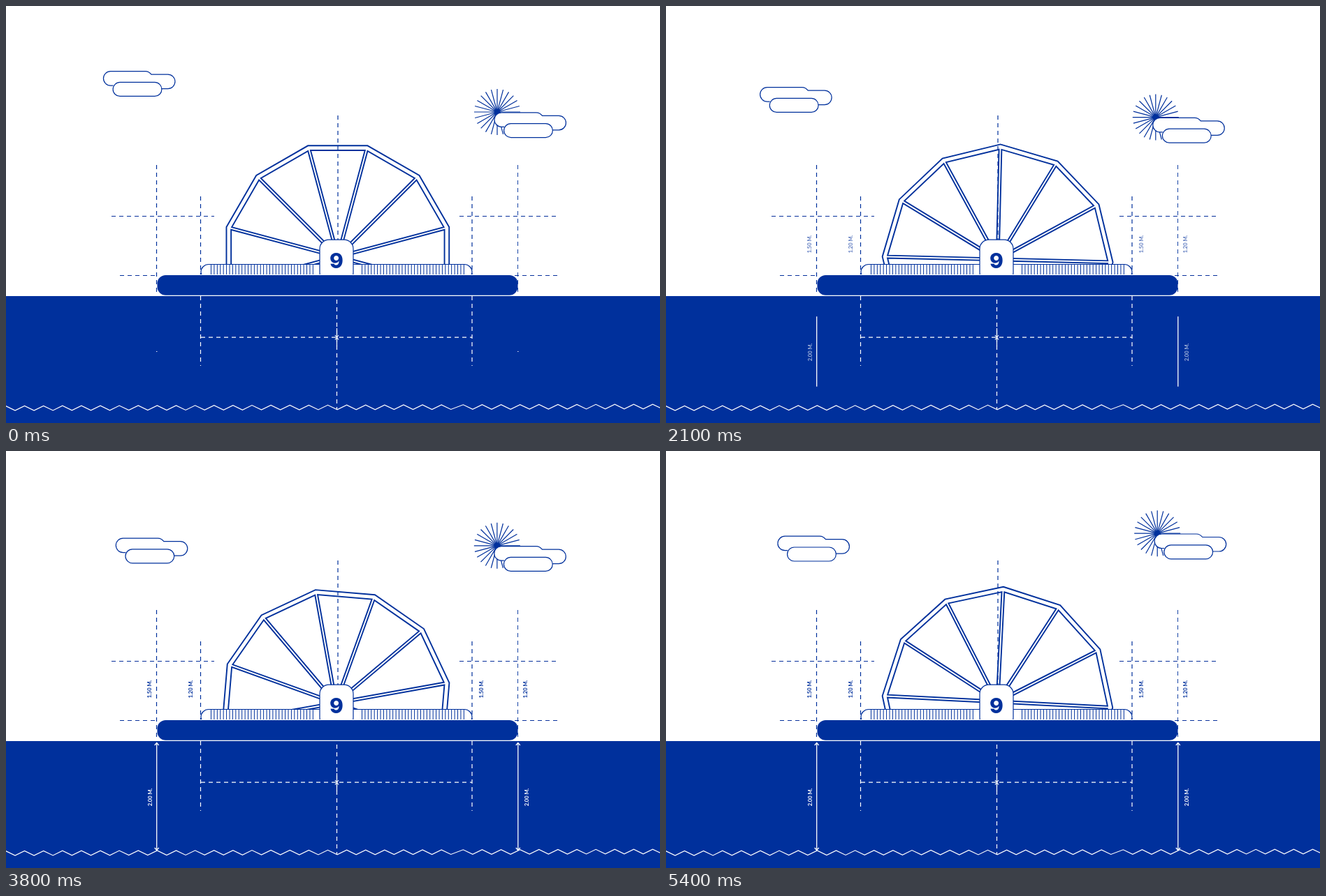
Animation of 936x598 px, one loop 5.5 s. Source, as an HTML page with a canvas:

```html
<!DOCTYPE html>
<html lang="en">
<head>
<meta charset="utf-8">
<title>Wheel blueprint</title>
<style>
html, body { margin: 0; width: 100%; height: 100%; overflow: hidden; background: #fff; }
canvas { display: block; width: 936px; height: 598px; }
</style>
</head>
<body>
<canvas id="stage" width="936" height="598"></canvas>
<script>
const ctx = document.getElementById('stage').getContext('2d');
const BLUE = '#00309c', WHITE = '#fff';
const LOOP = 5500, STEP = 100;
const KEYS = [0, 700, 1300, 2100, 3300, 4400, 5400];
const TURN = [0, 44, 84.1, 136.4, 212.7, 283.5, 347.9];
const CLOUD_X = [139.5, 135.5, 132, 134.7, 152.2, 161.2, 160];
const CLOUD_Y = [93.6, 100.5, 107.2, 116.6, 123.8, 125.2, 122.2];
const SUN_X = [703, 702, 701.3, 700.8, 702.3, 703.3, 703.2];
const SUN_Y = [152, 156.2, 160.5, 159.6, 142.3, 128.7, 118.2];

// Smooth (cubic Hermite) value of a keyed track at time t
function track(values, t) {
  const last = KEYS.length - 1;
  let i = 0;
  while (i < last - 1 && t > KEYS[i + 1]) i++;
  const slope = k => {
    const a = Math.max(k - 1, 0), b = Math.min(k + 1, last);
    return (values[b] - values[a]) / (KEYS[b] - KEYS[a]);
  };
  const span = KEYS[i + 1] - KEYS[i], u = (t - KEYS[i]) / span;
  const u2 = u * u, u3 = u2 * u;
  return values[i] * (2 * u3 - 3 * u2 + 1) + slope(i) * span * (u3 - 2 * u2 + u) +
    values[i + 1] * (3 * u2 - 2 * u3) + slope(i + 1) * span * (u3 - u2);
}

function pen(color, width, dash = []) {
  ctx.strokeStyle = color;
  ctx.lineWidth = width;
  ctx.setLineDash(dash);
}

function line(x1, y1, x2, y2) {
  ctx.beginPath();
  ctx.moveTo(x1, y1);
  ctx.lineTo(x2, y2);
  ctx.stroke();
}

function box(x, y, w, h, r) {
  ctx.beginPath();
  ctx.roundRect(x, y, w, h, r);
  ctx.fill();
}

function wheel(degrees) {
  const radius = 165, sector = Math.PI / 6, half = sector / 2;
  const apex = 7.3, inner = 152.7, spread = (inner - apex) * Math.tan(half);
  ctx.save();
  ctx.beginPath();
  ctx.rect(0, 0, 936, 371);
  ctx.clip();
  ctx.translate(474, 361.5);
  ctx.rotate(degrees * Math.PI / 180);
  ctx.translate(0.85, -1.8);
  pen(BLUE, 1.9);
  ctx.beginPath();
  for (let k = 0; k < 12; k++) {
    const a = half + k * sector;
    ctx.lineTo(radius * Math.sin(a), -radius * Math.cos(a));
  }
  ctx.closePath();
  ctx.stroke();
  for (let k = 0; k < 12; k++) {
    ctx.beginPath();
    ctx.moveTo(0, -apex);
    ctx.lineTo(-spread, -inner);
    ctx.lineTo(spread, -inner);
    ctx.closePath();
    ctx.stroke();
    ctx.rotate(sector);
  }
  ctx.restore();
}

function cloud(x, y) {
  ctx.save();
  ctx.translate(x, y);
  pen(BLUE, 1.2);
  ctx.fillStyle = WHITE;
  ctx.beginPath();
  ctx.moveTo(14, 20.5);
  ctx.arc(10.2, 10.25, 10.25, Math.PI / 2, Math.PI * 1.5);
  ctx.lineTo(60, 0);
  ctx.quadraticCurveTo(65, 0, 68.5, 4.5);
  ctx.arc(92.2, 14.75, 10.25, -Math.PI / 2, Math.PI / 2);
  ctx.lineTo(82, 25);
  ctx.fill();
  ctx.stroke();
  box(13.6, 15.8, 69.8, 20, 10);
  ctx.stroke();
  ctx.restore();
}

function sun(x, y) {
  pen(BLUE, 1.2);
  for (let k = 0; k < 24; k++) {
    const a = k * Math.PI / 12;
    line(x, y, x + 33 * Math.cos(a), y + 33 * Math.sin(a));
  }
  ctx.fillStyle = BLUE;
  ctx.beginPath();
  ctx.arc(x, y, 4.5, 0, 7);
  ctx.fill();
}

function pier() {
  ctx.fillStyle = WHITE;
  pen(BLUE, 1.2);
  box(279, 370.5, 388, 22, 13);
  ctx.stroke();
  pen(BLUE, 1);
  for (let k = 0; k <= 33; k++) {
    const dx = k * 4.42;
    line(293.5 + dx, 371, 293.5 + dx, 385);
    line(509.5 + dx, 371, 509.5 + dx, 385);
  }
  pen(BLUE, 1.2);
  box(449, 335.2, 48, 60, 13);
  ctx.stroke();
  ctx.fillStyle = WHITE;
  ctx.fillRect(210, 385, 530, 31);
  ctx.fillStyle = BLUE;
  box(216.5, 386, 516, 28.8, 12);
  ctx.font = '800 30px Inter, sans-serif';
  ctx.textAlign = 'center';
  ctx.textBaseline = 'alphabetic';
  ctx.fillText('9', 473, 376.3);
}

function water() {
  ctx.fillStyle = BLUE;
  ctx.fillRect(0, 416, 936, 182);
  pen(WHITE, 1.2);
  ctx.beginPath();
  for (let k = -1; k <= 70; k++) {
    const x = 13 + k * 13.56 + (k > 46 ? 4 : 0);
    ctx.lineTo(x, 576.8 - x * 0.0026 + (k % 2 ? -3.3 : 3.3));
  }
  ctx.stroke();
}

function guides() {
  const dash = [6, 5];
  pen(BLUE, 1.2, dash);
  for (const [x1, x2, y] of [[151, 298, 301.5], [649, 792, 301.5], [163, 216, 386.5], [728, 792, 386.5]])
    line(x1, y, x2, y);
  for (const [x, y1, y2] of [[215.5, 228, 415], [278.5, 273, 385], [667, 273, 385], [475, 157, 335]])
    line(x, y1, x, y2);
  pen(BLUE, 0.9, dash);
  line(732.5, 228, 732.5, 415);
  pen(WHITE, 1.2, dash);
  line(278.5, 416, 278.5, 516);
  line(667, 416, 667, 516);
  line(473.5, 421, 473.5, 579);
  line(279, 475.2, 667, 475.2);
  pen(WHITE, 1.2);
  line(473.5, 462, 473.5, 488);
  line(471, 472, 476, 478.5);
  line(476, 472, 471, 478.5);
}

function depthArrow(x, reach) {
  const top = 418.5, bottom = 572.5;
  ctx.save();
  ctx.beginPath();
  ctx.rect(x - 6, 495.5 - reach, 12, 2 * reach);
  ctx.clip();
  pen(WHITE, 1.3);
  line(x, top, x, bottom);
  for (const [y, dy] of [[top, 3.5], [bottom, -3.5]]) {
    ctx.beginPath();
    ctx.moveTo(x - 3, y + dy);
    ctx.lineTo(x, y);
    ctx.lineTo(x + 3, y + dy);
    ctx.stroke();
  }
  ctx.restore();
}

function label(text, x, y, color) {
  ctx.save();
  ctx.translate(x, y);
  ctx.rotate(-Math.PI / 2);
  ctx.font = 'bold 7.5px Lato, sans-serif';
  ctx.textAlign = 'center';
  ctx.textBaseline = 'alphabetic';
  ctx.fillStyle = color;
  ctx.fillText(text, 0, 2.8);
  ctx.restore();
}

function measures(t) {
  const reach = Math.min(0.5 + t * 0.0237, 79);
  depthArrow(215.7, reach);
  depthArrow(732.8, reach);
  ctx.globalAlpha = Math.min(t / 3300, 1);
  label('1.50 M.', 205, 341.5, BLUE);
  label('1.20 M.', 264, 341.5, BLUE);
  label('1.50 M.', 680, 341.5, BLUE);
  label('1.20 M.', 743, 341.5, BLUE);
  label('2.00 M.', 206, 496.5, WHITE);
  label('2.00 M.', 745, 496.5, WHITE);
  ctx.globalAlpha = 1;
}

function draw(t) {
  ctx.setLineDash([]);
  ctx.fillStyle = WHITE;
  ctx.fillRect(0, 0, 936, 598);
  const sx = track(SUN_X, t), sy = track(SUN_Y, t);
  sun(sx, sy);
  cloud(sx - 4, sy + 0.8);
  cloud(track(CLOUD_X, t), track(CLOUD_Y, t));
  wheel(track(TURN, t));
  pier();
  water();
  guides();
  measures(t);
}

const start = performance.now();
function tick() {
  const t = (performance.now() - start) % LOOP;
  draw(Math.floor(t / STEP) * STEP);
  requestAnimationFrame(tick);
}
tick();
</script>
</body>
</html>
```
